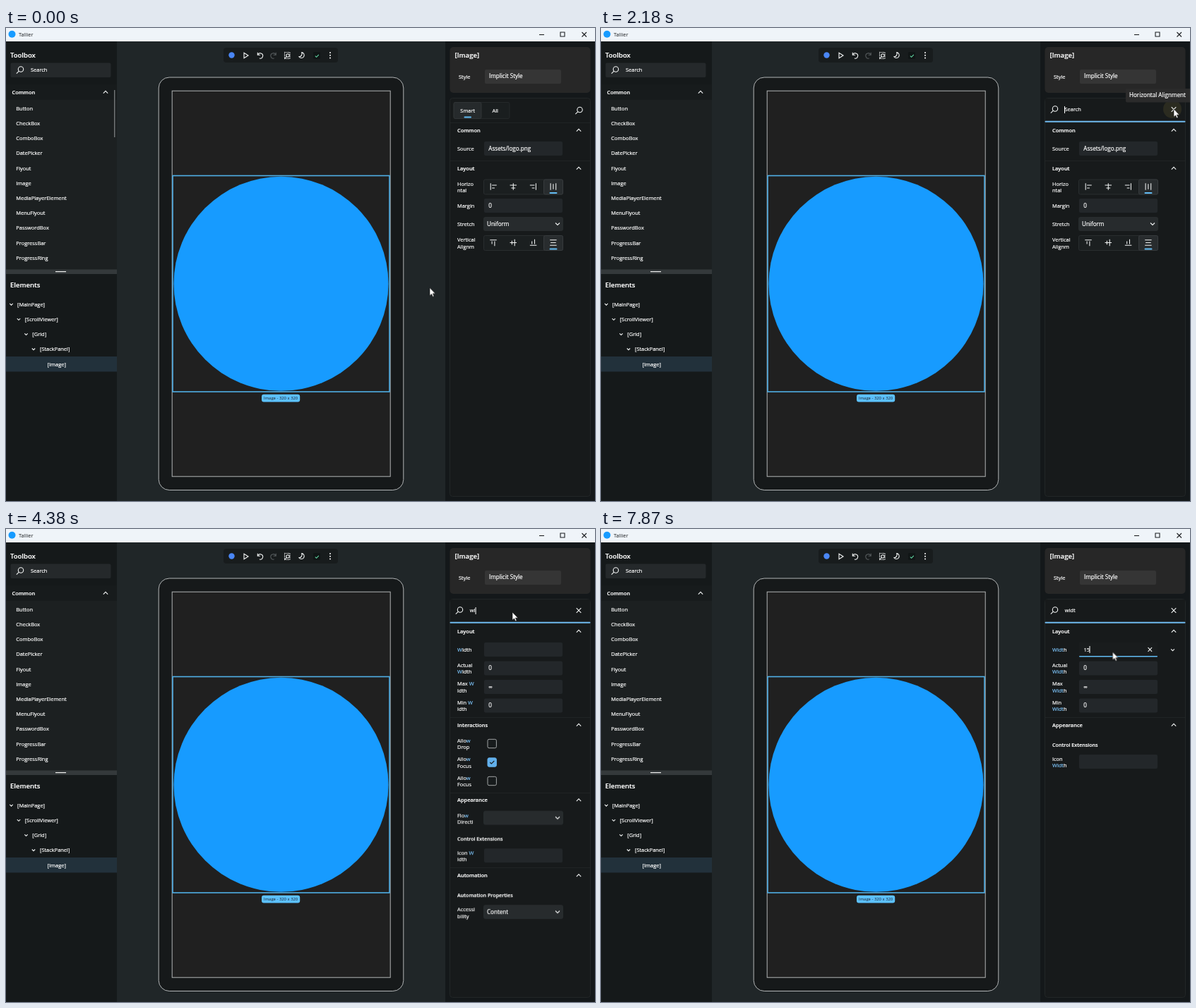
These frames come from a looping animation (834 by 671 pixels, 8000 ms). An HTML page:

```html
<!DOCTYPE html>
<html lang="en">
<head>
<meta charset="utf-8">
<title>Designer</title>
<style>
html, body { margin: 0; width: 100%; height: 100%; overflow: hidden; background: #15191a; }
svg { display: block; width: 834px; height: 671px; }
text {
  font-family: "Open Sans", "Noto Sans", sans-serif; font-size: 7.45px;
  fill: #fff; stroke: #fff; stroke-width: .2; white-space: pre;
}
.h1 { font-size: 9.5px; font-weight: 600; }
.h2 { font-size: 7.45px; font-weight: 600; }
.h3 { font-size: 7.15px; font-weight: 600; }
.in { font-size: 8.1px; }
.hit { fill: #79bdf0; stroke: #79bdf0; }
.dark { fill: #1c1f22; stroke: none; }
.badge { font-size: 5.9px; }
.ic { fill: none; stroke: #f2f4f4; stroke-width: 1.1; }
.ink { stroke: #1c1f22; }
.step { animation: 8s step-end infinite; }
.settle { animation: settle 8s linear infinite; }
@keyframes settle {
  0%, 51.4% { transform: translateY(0); }
  54%, 100% { transform: translateY(-.8px); }
}
#cursor { animation: move 8s linear infinite; }
@keyframes move {
  0%, 5.2% { transform: translate(600px, 368.5px); animation-timing-function: ease-in-out; }
  15.625%, 16% { transform: translate(724px, 176px); animation-timing-function: ease-in-out; }
  21.5% { transform: translate(799px, 120.5px); animation-timing-function: ease-out; }
  24.5%, 30.6% { transform: translate(811px, 115px); animation-timing-function: ease-in; }
  34.75% { transform: translate(774.5px, 126px); animation-timing-function: ease-out; }
  39.75%, 74.8% { transform: translate(717px, 118px); }
  75.25% { transform: translate(715px, 120px); animation-timing-function: ease-in-out; }
  81.5% { transform: translate(724px, 173px); }
  84.5%, 87.6% { transform: translate(723px, 162px); animation-timing-function: ease-in-out; }
  92.6%, 100% { transform: translate(724.5px, 174.5px); }
}
</style>
</head>
<body>
<script>
const LOOP = 8000, BLUE = '#63bdf5', EDGE = '#b2b5b6';
let css = '', count = 0;

// "*x*" marks a highlighted run
const mark = s => String(s).replace(/\*(.+?)\*/g, '<tspan class="hit">$1</tspan>');
// y is the middle of the capitals
const text = (x, y, s, cls = '', dy = 2.7) => `<text x="${x}" y="${y + dy}" class="${cls}">${mark(s)}</text>`;
const rect = (x, y, w, h, fill, r = 0, stroke = 'none', sw = 1) =>
  `<rect x="${x}" y="${y}" width="${w}" height="${h}" rx="${r}" fill="${fill}" stroke="${stroke}" stroke-width="${sw}"/>`;
const dot = (x, y, r, fill) => `<circle cx="${x}" cy="${y}" r="${r}" fill="${fill}"/>`;
const path = (d, extra = '', cls = '') => `<path class="ic ${cls}" d="${d}" ${extra}/>`;
const at = (x, y, s) => `<g transform="translate(${x} ${y})">${s}</g>`;

// Visible only from a to b (ms)
function on(a, b, s) {
  const name = 'on' + count++;
  css += `@keyframes ${name}{0%{opacity:0}${a / LOOP * 100}%{opacity:1}` +
    (b < LOOP ? `${b / LOOP * 100}%{opacity:0}` : '') + `100%{opacity:${b < LOOP ? 0 : 1}}}`;
  return `<g class="step" style="animation-name:${name}">${s}</g>`;
}

const down = (x, y, w = 2.2) => path(`M${x - w} ${y - w / 2}l${w} ${w} ${w} ${-w}`);
const up = (x, y, w = 3.2) => path(`M${x - w} ${y + w / 2}l${w} ${-w} ${w} ${w}`);
const cross = (x, y, r) => path(`M${x - r} ${y - r}l${2 * r} ${2 * r}m0 ${-2 * r}l${-2 * r} ${2 * r}`);
const lens = (x, y) => path(`M${x - 1.6} ${y + 1.6}l-3.6 3.6`) +
  `<circle class="ic" cx="${x + 1}" cy="${y - 1}" r="3.7"/>`;
const caret = (x, y) => rect(x, y - 5, 1, 10, '#fff');
const rule = y => rect(629, y, 198, 1, '#202425');
const field = (y, v = '') => rect(677, y - 10, 111, 20, '#23272a', 2) + text(683.3, y, v, 'in');
const combo = (y, v = '') => rect(676.5, y - 9.5, 112, 19, '#272b2d', 2, '#303436', .6) +
  text(681, y, v, 'in') + down(781, y, 3);
const section = (y, s) => text(639, y, s, 'h2') + up(811, y);
const label = (y, a, b) => b ? text(639, y - 4.5, a) + text(639, y + 4.8, b) : text(639, y, a);

function titleBar() {
  return rect(0, 0, 834, 19, '#eff4f9') + dot(8.5, 8.8, 5, '#179bff') + text(18, 9, 'Tallier', 'dark') +
    path('M755 9.5h7', '', 'ink') + path('M785 6h6v6h-6z', '', 'ink') +
    path('M815.5 6l6.5 6.5m0-6.5l-6.5 6.5', '', 'ink');
}

function leftPane() {
  const tools = ['Button', 'CheckBox', 'ComboBox', 'DatePicker', 'Flyout', 'Image', 'MediaPlayerElement',
    'MenuFlyout', 'PasswordBox', 'ProgressBar', 'ProgressRing'];
  const tree = ['MainPage', 'ScrollViewer', 'Grid', 'StackPanel', 'Image'];
  return rect(0, 19, 157, 652, '#15191a') + text(6, 38, 'Toolbox', 'h1', 3.5) +
    rect(6.5, 49.5, 142, 20.5, '#25292b', 2) + lens(20, 59.5) + text(35, 59.5, 'Search') +
    rect(0, 80, 157, 22, '#171b1c') + rect(0, 102, 157, 241, '#1c2021') +
    text(8.5, 91, 'Common', 'h2') + up(141, 91) + on(0, 700, rect(153.3, 88, 1, 67, '#9a9d9e')) +
    tools.map((s, i) => text(14.3, 114 + i * 21.22, s)).join('') +
    rect(0, 342.5, 157, 6.5, '#34393b') + rect(70, 345, 15, 1.2, '#f0f0f0') +
    text(6, 364, 'Elements', 'h1', 3.5) + rect(0, 466, 157, 21.5, '#22313b') +
    tree.map((s, i) => {
      const y = 392 + i * 21.2;
      return (i < 4 ? down(7.5 + i * 10.5, y) : '') + text(16 + i * 10.65, y, `[${s}]`);
    }).join('');
}

function toolbar() {
  return rect(308, 28, 162, 21, '#181c1d', 4) + dot(319.5, 38.5, 4.2, '#4a86f5') +
    path('M337 35.3l6 3.7-6 3.7z') + path('M356.3 34.8v3.4h3.6M356.5 38a3.7 3.7 0 1 1 2.4 5') +
    path('M382.2 34.8v3.4h-3.6M382 38a3.7 3.7 0 1 0-2.4 5', 'style="stroke:#565b5d"') +
    path('M394.5 34.5h7.5v9h-7.5z', 'stroke-dasharray="1.5 1"') +
    `<circle class="ic" cx="399" cy="39" r="2.2"/>` + path('M397.3 40.7l-3 3.3') +
    path('M418.8 34.6a4 4 0 1 1-3.9 6.2c3.2 0 4.8-3 3.9-6.2z') +
    rect(435, 34, 10, 10, '#101515', 2) + path('M437.8 39.6l1.8 1.7 3.2-3.4', 'style="stroke:#62d9a5"') +
    [35, 38.7, 42.4].map(y => dot(459, y, 1, '#fff')).join('');
}

function phone() {
  return rect(157, 19, 465, 652, '#202628') + toolbar() +
    rect(216.2, 70, 346.6, 585.5, '#16191a', 15, EDGE) +
    rect(235.2, 89.2, 309, 547, '#202020', 0, EDGE) +
    dot(389.5, 362.8, 152, '#179bff') +
    rect(236, 209.5, 307, 306.5, 'none', 0, '#50b0e6', 1.6) +
    rect(362, 519.8, 54.2, 10.6, '#5cc1ff', 3) + text(365, 525, 'Image - 320 x 320', 'badge dark', 2.3);
}

// Alignment buttons: each icon is drawn for the horizontal row and turned for the vertical one
function segments(y, turn) {
  const icons = ['M-4-5v10M-2-2h7M-2 2h4', 'M0-5v10M-5-2h10M-3 2h6', 'M4-5v10M2-2h-7M2 2h-4', 'M-4-5v10M4-5v10M0-4v8'];
  return rect(676.5, y - 10.5, 112, 21, '#1b1f20', 2, '#292d2f') +
    rect(761.5, y - 10.5, 27, 21, '#282c2e', 2, '#373b3d') +
    icons.map((d, i) => at(690 + i * 28.3, y - .5, path(d, `transform="rotate(${turn}) scale(.95)"`))).join('') +
    rect(769.5, y + 7.5, 11, 2, BLUE, 1);
}

function allProps() {
  return section(145, 'Common') + label(171.5, 'Source') + field(171, 'Assets/logo.png') + rule(188) +
    section(199, 'Layout') + label(225.3, 'Horizo', 'ntal') + segments(225.5, 0) +
    label(252, 'Margin') + field(252, '0') + label(278, 'Stretch') + combo(278, 'Uniform') +
    label(305, 'Vertical', 'Alignm') + segments(305, 90);
}

function sizes(labels) {
  return section(145, 'Layout') + labels.map((l, i) => label(171 + i * 26.5, ...l) +
    field(171 + i * 26.5, ['', '0', '∞', '0'][i])).join('') + rule(267);
}

function check(y, ticked) {
  return rect(682, y - 6.2, 12.4, 12.4, ticked ? '#62b0ec' : '#171b1c', 2, ticked ? '#62b0ec' : '#a3a6a7') +
    (ticked ? path(`M685.3 ${y}l2 2 4-4`, '', 'ink') : '');
}

function firstHits() {
  return sizes([['*W*idth'], ['Actual', '*W*idth'], ['Max *W*', 'idth'], ['Min *W*', 'idth']]) +
    section(278, 'Interactions') + ['Drop', 'Focus', 'Focus'].map((s, i) =>
      label(304.5 + i * 26.5, 'Allo*w*', s) + check(304.5 + i * 26.5, i === 1)).join('') + rule(374) +
    section(384.5, 'Appearance') +
    `<g class="settle">${label(411.5, 'Flo*w*', 'Directi')}${combo(410.5)}${text(639, 440, 'Control Extensions', 'h3')}` +
    label(464.5, 'Icon *W*', 'idth') + field(464) + '</g>' + rule(480) + section(491.5, 'Automation') +
    `<g class="settle">${text(639, 520.3, 'Automation Properties', 'h3')}${label(545, 'Accessi', 'bility')}` +
    combo(544, 'Content') + '</g>';
}

function widthHits(w) {
  return sizes([[w], ['Actual', w], ['Max', w], ['Min', w]]) + section(278, 'Appearance') +
    text(639, 306, 'Control Extensions', 'h3') + label(330.5, 'Icon', w) + field(330);
}

function searchBar() {
  const typed = [[4050, 4320, 'w', 662.6], [4320, 4500, 'wi', 664.6], [4500, 5030, 'wid', 669], [5030, LOOP, 'widt', 671.2]];
  return rect(629, 100, 198, 34.5, '#171a1b') + on(2120, 2900, dot(809, 115, 13, '#2b2b20')) +
    lens(642, 115.5) + cross(811, 115.5, 3.3) + rect(628.5, 131.8, 199, 1.9, '#70baf0', 1) +
    on(2120, 4050, text(656.5, 115.5, 'Search')) +
    on(2120, 2620, caret(656, 116)) + on(3130, 3650, caret(656, 116)) +
    typed.map(([a, b, s, x]) => on(a, b, text(656.7, 115.5, s)) + on(a, Math.min(b, 5560), caret(x, 116))).join('') +
    on(6020, 6600, caret(671.2, 116));
}

function widthEdit() {
  return rect(677, 161, 111, 20.5, '#191c1d', 2) + rect(677, 180, 111, 1.5, BLUE, .7) + down(809.5, 171.5, 2.4) +
    on(6600, 7100, caret(683.5, 171)) +
    on(7620, 7870, text(683.5, 171, '1') + caret(687.8, 171)) +
    on(7870, LOOP, text(683.5, 171, '15') + caret(691.5, 171)) +
    on(7620, LOOP, cross(777.3, 171, 2.8));
}

function rightPane() {
  const tabs = rect(634, 105.5, 79, 23, '#1a1e1f', 2, '#25292a') + rect(634, 105.5, 39, 23, '#262a2c', 2, '#303436') +
    text(643.3, 117.5, 'Smart') + text(688.5, 117.5, 'All') + rect(648.5, 125.6, 10.5, 2, BLUE, 1) + lens(811.5, 117);
  return rect(622, 19, 212, 652, '#14181a') + rect(628.5, 27, 199, 65, '#272727', 5) +
    text(635.5, 38.5, '[Image]', 'h1', 3.5) + text(641, 69, 'Style') +
    rect(678, 59, 108, 20, '#353535', 2) + text(684, 68.5, 'Implicit Style', 'in') +
    rect(628.5, 99.5, 199, 565, '#171a1b', 4, '#222627') + rule(134) +
    on(0, 2120, tabs) + on(2120, LOOP, searchBar()) +
    on(0, 4050, allProps()) + on(4050, 4500, firstHits()) +
    on(4500, 5030, widthHits('*Wid*th')) + on(5030, LOOP, widthHits('*Widt*h')) +
    on(6600, LOOP, widthEdit()) +
    on(1780, 4050, rect(743, 86, 95, 19.5, '#2b2b2b', 2) + text(748, 95.5, 'Horizontal Alignment', 'in'));
}

const pointer = `<g id="cursor"><path d="M0 0v11.2l2.6-2.3 1.7 3.9 1.8-.8-1.7-3.8h3.5z" fill="#fff" stroke="#111" stroke-width=".6"/></g>`;
const scene = phone() + leftPane() + rightPane() + titleBar() + pointer;
document.head.insertAdjacentHTML('beforeend', `<style>${css}</style>`);
document.body.innerHTML = `<svg viewBox="0 0 834 671">${scene}</svg>`;
</script>
</body>
</html>
```
